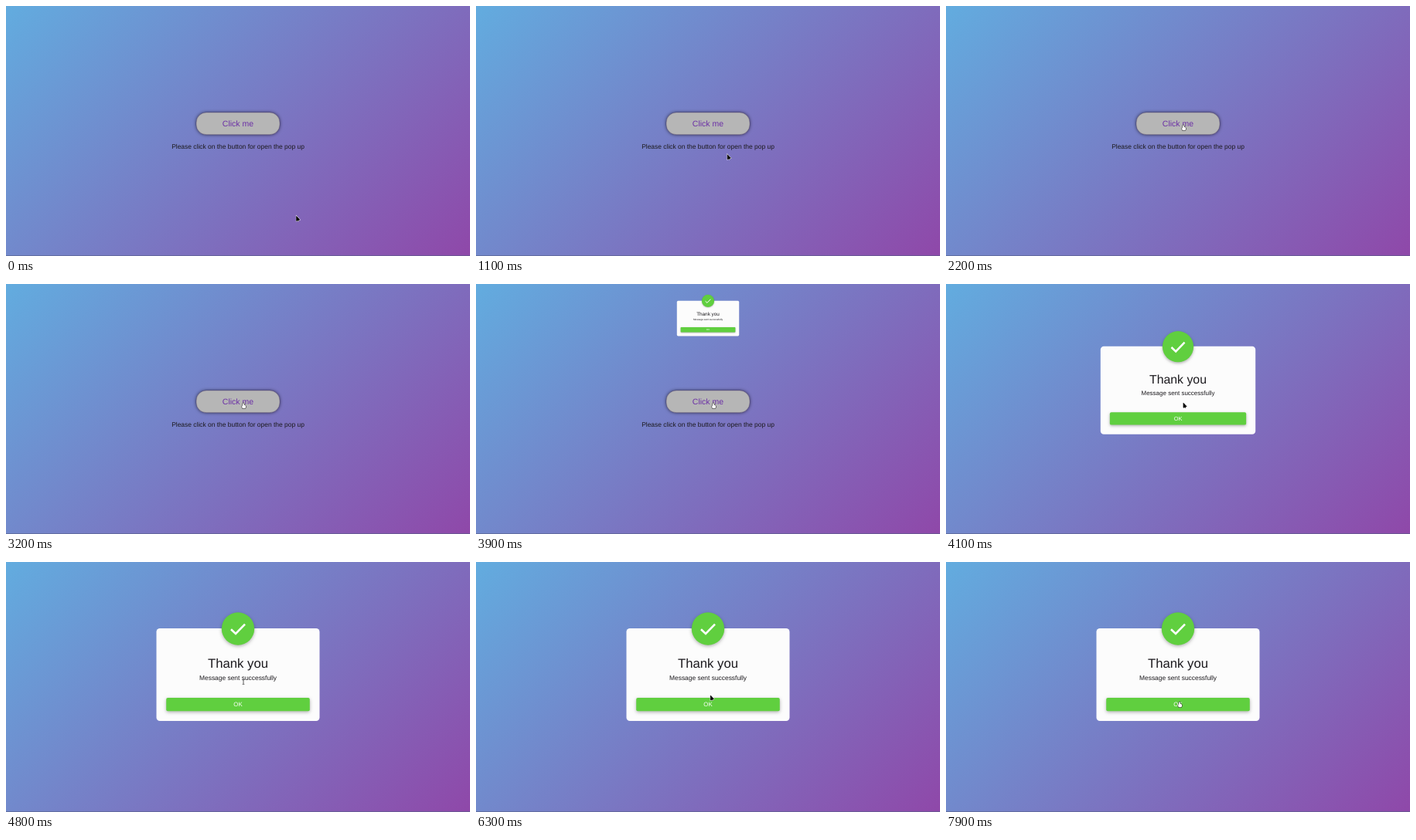
An HTML page with a canvas that plays this animation: 600 by 324 pixels, repeating every 8000 ms.

```html
<!DOCTYPE html>
<html lang="en">
<head>
<meta charset="utf-8">
<title>Pop up</title>
<style>
  html, body { margin: 0; width: 100%; height: 100%; overflow: hidden; background: #7a78c4; }
  canvas { display: block; width: 600px; height: 324px; }
</style>
</head>
<body>
<canvas id="stage"></canvas>
<script>
const W = 600, H = 324, MID = W / 2, LOOP = 8000, STEP = 100;
const OPEN = 3817, OPENING = 400;
const GREEN = '#60cf3f', INK = '#1c1a1e';
const FONT = '"Liberation Sans", Arial, sans-serif';
const canvas = document.getElementById('stage');
const ctx = canvas.getContext('2d');
const ratio = window.devicePixelRatio || 1;
canvas.width = W * ratio;
canvas.height = H * ratio;
ctx.textRendering = 'geometricPrecision';
ctx.textAlign = 'center';

// A 135deg CSS gradient: its line reaches (W + H) / 4 from the centre on each axis.
const reach = (W + H) / 4;
const sky = ctx.createLinearGradient(MID - reach, H / 2 - reach, MID + reach, H / 2 + reach);
sky.addColorStop(0, '#62acdf');
sky.addColorStop(1, '#8f48a9');

const home = { x: 375.6, y: 272.5 };
const moves = [
  { from: 400, to: 800, x: 340, y: 206 },
  { from: 900, to: 1200, x: 320, y: 188 },
  { from: 1600, to: 2200, x: 307, y: 154.3 },
  { from: 5400, to: 6300, x: 303.3, y: 173 },
  { from: 6400, to: 7000, x: 302, y: 181.3 }
];

const clamp = v => Math.min(1, Math.max(0, v));
const lerp = (a, b, k) => a + (b - a) * k;
const smooth = k => k * k * (3 - 2 * k);
const bez = (a, b, u) => 3 * a * u * (1 - u) ** 2 + 3 * b * u * u * (1 - u) + u ** 3;

// CSS "ease": cubic-bezier(.25, .1, .25, 1), solved by bisection
function ease(x) {
  if (x <= 0 || x >= 1) return clamp(x);
  let lo = 0, hi = 1;
  for (let i = 0; i < 24; i++) {
    const mid = (lo + hi) / 2;
    if (bez(0.25, 0.25, mid) < x) lo = mid; else hi = mid;
  }
  return bez(0.1, 1, lo);
}

function pointerAt(t) {
  return moves.reduce((p, m) => {
    const k = smooth(clamp((t - m.from) / (m.to - m.from)));
    return { x: lerp(p.x, m.x, k), y: lerp(p.y, m.y, k) };
  }, home);
}

function pointerKind(t, y) {
  if (t < OPEN + OPENING / 2) return y < 167 ? 'hand' : 'arrow';
  if (t < OPEN + OPENING) return 'arrow';
  if (y < 157) return 'beam';
  return y < 176 ? 'arrow' : 'hand';
}

function shadow(alpha, blur, dy) {
  ctx.shadowColor = `rgba(0,0,0,${alpha})`;
  ctx.shadowBlur = blur * ratio;
  ctx.shadowOffsetY = dy * ratio;
}

function box(x, y, w, h, r, fill) {
  ctx.beginPath();
  ctx.roundRect(x, y, w, h, r);
  ctx.fillStyle = fill;
  ctx.fill();
}

function label(str, x, y, size, color) {
  ctx.font = `${size}px ${FONT}`;
  ctx.fillStyle = color;
  ctx.fillText(str, x, y);
}

function stroke(color, width) {
  ctx.strokeStyle = color;
  ctx.lineWidth = width;
  ctx.stroke();
}

function page() {
  ctx.fillStyle = sky;
  ctx.fillRect(0, 0, W, H);
  ctx.fillStyle = 'rgba(85,95,135,.6)';
  ctx.fillRect(0, H - 1, W, 1);
  shadow(0.65, 4, 0);
  box(MID - 54, 138, 108, 28.7, 13, '#b6b6b6');
  shadow(0, 0, 0);
  stroke('rgba(70,50,95,.5)', 0.7);
  label('Click me', MID, 156.3, 10.5, '#6b2fa6');
  label('Please click on the button for open the pop up', MID, 185.2, 8.45, INK);
}

function popup(f) {
  const scale = lerp(0.1, 1, f);
  ctx.save();
  ctx.translate(MID, lerp(-1.5, 146, f));
  ctx.scale(scale, scale);
  box(-105.5, -60, 211, 120, 4.5, '#fcfcfc');

  shadow(0.3, 4 * scale, 1.5 * scale);
  box(-21.2, -80.7, 42.4, 42.4, 21.2, GREEN);
  box(-92.8, 30, 185.6, 17.2, 2, GREEN);
  shadow(0, 0, 0);

  ctx.beginPath();
  ctx.moveTo(-9, -58.7);
  ctx.lineTo(-3, -53);
  ctx.lineTo(9, -65.3);
  stroke('#fff', 2.6);
  label('Thank you', 0, -8.8, 16.7, INK);
  label('Message sent successfully', 0, 7, 8.41, INK);
  label('OK', 0, 41.4, 7.8, '#fff');
  ctx.restore();
}

const pointers = {
  arrow() {
    ctx.beginPath();
    ctx.moveTo(0, 0);
    ctx.lineTo(0, 6);
    ctx.lineTo(4.2, 4.4);
    ctx.closePath();
    ctx.moveTo(1.5, 4);
    ctx.lineTo(2.8, 6.7);
    stroke('#fff', 1.4);
    stroke('#000', 0.7);
    ctx.fillStyle = '#000';
    ctx.fill();
  },
  hand() {
    ctx.beginPath();
    ctx.roundRect(-0.8, 0, 1.6, 4, 0.8);
    ctx.roundRect(-1.8, 2.7, 4.8, 4.2, 1.4);
    stroke('#222', 1.1);
    ctx.fillStyle = '#fff';
    ctx.fill();
  },
  beam() {
    ctx.fillStyle = '#333';
    ctx.fillRect(-0.4, -2, 0.8, 6);
    for (const y of [-2.3, 3.7]) ctx.fillRect(-1.4, y, 2.8, 0.6);
  }
};

function draw(t) {
  ctx.setTransform(ratio, 0, 0, ratio, 0, 0);
  page();
  const f = ease((t - OPEN) / OPENING);
  if (f > 0) popup(f);
  const { x, y } = pointerAt(t);
  ctx.translate(x, y);
  pointers[pointerKind(t, y)]();
}

let start;
function tick(now) {
  start ??= now;
  // The screen advances in whole steps; the small lead absorbs timer jitter.
  draw(Math.floor((now - start + 25) / STEP) * STEP % LOOP);
  requestAnimationFrame(tick);
}
draw(0);
requestAnimationFrame(tick);
</script>
</body>
</html>
```
